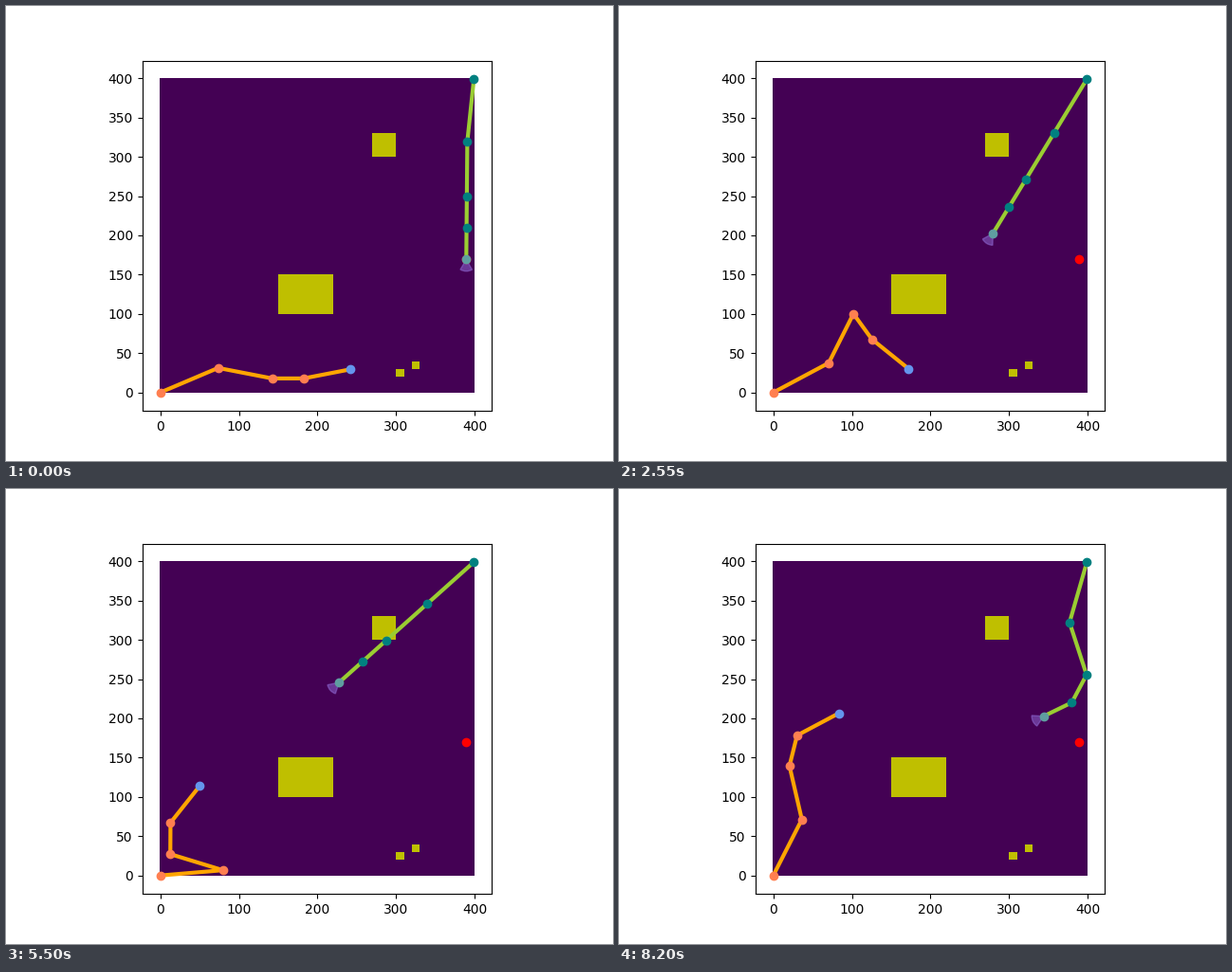
These frames come from a looping animation (640 by 480 pixels, 8.25 s). A matplotlib script:

```python
import numpy as np
import matplotlib.pyplot as plt
from matplotlib.animation import FuncAnimation
from matplotlib.patches import Rectangle, Wedge

FRAMES, INTERVAL = 165, 50
SIZE = 400
CENTER = (SIZE - 1) / 2
SPEED = np.degrees(0.05)  # joint-space distance per frame


class Arm:
    """Planar arm; waypoints hold joint angles relative to the previous link."""

    def __init__(self, ax, base, links, times, waypoints, line, joint, tip):
        self.base, self.links = base, links
        self.times, self.waypoints = times, np.array(waypoints)
        self.line, = ax.plot([], [], color=line, lw=3, zorder=2)
        self.joints, = ax.plot([], [], "o", color=joint, zorder=3)
        self.tip, = ax.plot([], [], "o", color=tip, zorder=5)

    def pose(self, t):
        """Joint positions and the heading of the last link."""
        q = [np.interp(t, self.times, angles) for angles in self.waypoints.T]
        heading = np.cumsum(q)
        rad = np.radians(heading)
        steps = np.c_[np.cos(rad), np.sin(rad)] * np.c_[self.links]
        points = np.vstack([[0, 0], np.cumsum(steps, axis=0)]) + self.base
        return points, heading[-1]

    def draw(self, t):
        points, heading = self.pose(t)
        self.line.set_data(*points.T)
        self.joints.set_data(*points[:-1].T)
        self.tip.set_data(*points[-1:].T)
        return points[-1], heading


def steady_times(waypoints):
    """Arrival times when moving through joint space at constant speed."""
    legs = np.linalg.norm(np.diff(waypoints, axis=0), axis=1)
    return np.r_[0, np.cumsum(legs)] / SPEED


def straight(angle):
    return (angle, 0, 0, 0)


fig, ax = plt.subplots(figsize=(6.4, 4.8), dpi=100)
ax.imshow(np.zeros((SIZE, SIZE)), origin="lower")
ax.set_xlim(CENTER - 222.5, CENTER + 222.5)
ax.set_ylim(CENTER - 223, CENTER + 223)
ax.set_xticks(range(0, SIZE + 1, 100))
ax.set_yticks(range(0, SIZE + 1, 50))

for x, y, w, h in [(150, 100, 70, 50), (270, 300, 30, 30),
                   (300, 20, 10, 10), (320, 30, 10, 10)]:
    ax.add_patch(Rectangle((x, y), w, h, color="y", lw=0))

fold = [(23, -34, 11, 11), (29, 48, -141, 16), (4, 162, -71, -40),
        (22, 131, -67, -28), (63, 40, -27, -48)]
left = Arm(ax, (0, 0), [80, 70, 40, 60], steady_times(fold), fold,
           "orange", "coral", "cornflowerblue")

# Straighten, sweep as one rod, then bend back.
sweep = {0: (-96, 5.5, 0, 0), 15: straight(-111), 111: straight(-138.5),
         125: (-120, -3, -13, 3), FRAMES - 1: (-106, 34, -46, -36)}
right = Arm(ax, (SIZE - 1, SIZE - 1), [80, 70, 40, 40],
            list(sweep), list(sweep.values()),
            "yellowgreen", "teal", "cadetblue")

goal = right.pose(0)[0][-1]
ax.plot(*goal, "o", color="red", zorder=1.5)
sensor = ax.add_patch(Wedge(goal, 15, 0, 60, color="mediumpurple",
                            alpha=0.5, zorder=4))


def update(t):
    left.draw(t)
    tip, heading = right.draw(t)
    sensor.set_center(tip)
    sensor.set_theta1(heading - 30)
    sensor.set_theta2(heading + 30)


anim = FuncAnimation(fig, update, frames=FRAMES, interval=INTERVAL,
                     repeat=True, repeat_delay=0)
plt.show()
```
